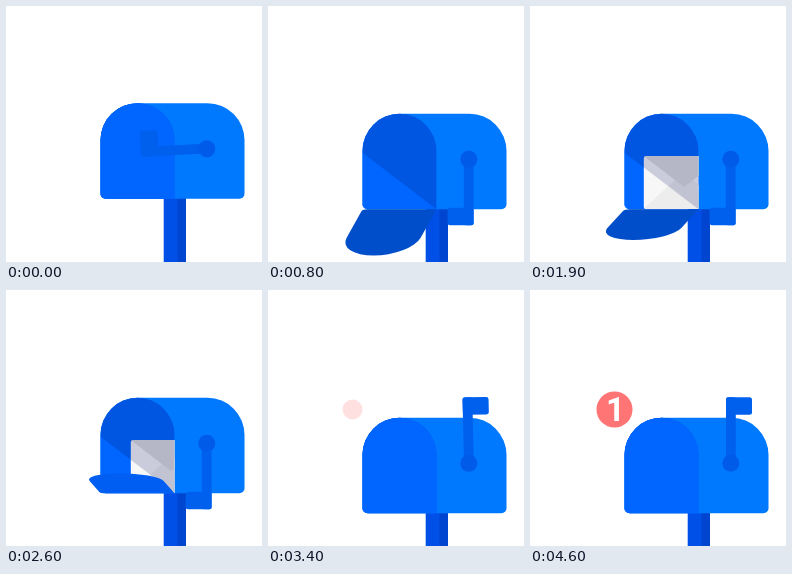
These frames come from a looping animation (256x256 px, 5800 ms). An HTML page with a canvas:

```html
<!DOCTYPE html>
<html lang="en">
<head>
<meta charset="utf-8">
<title>Mailbox</title>
<style>
html, body { margin: 0; width: 100%; height: 100%; overflow: hidden; background: #fff; }
canvas { display: block; width: 256px; height: 256px; }
</style>
</head>
<body>
<canvas id="stage" width="256" height="256"></canvas>
<script>
const ctx = document.getElementById('stage').getContext('2d');
const LOOP = 5800, STEP = 100, LAST = 46;

// Mailbox geometry, measured from the top of the box
const LEFT = 94.5, FRONT = 168.5, RIGHT = 238.5, H = 95.5, R = 37;

// Progress from 0 to 1 between two steps: linear, and eased at both ends
const ramp = (t, from, to) => Math.min(1, Math.max(0, (t - from) / (to - from)));
const smooth = (t, from, to) => {
  const p = ramp(t, from, to);
  return p * p * (3 - 2 * p);
};
const radians = deg => deg * Math.PI / 180;

function shape(color, ...points) {
  ctx.fillStyle = color;
  ctx.beginPath();
  points.forEach(p => ctx.lineTo(...p));
  ctx.fill();
}

function box(color, x, y, w, h, radii = 0) {
  ctx.fillStyle = color;
  ctx.beginPath();
  ctx.roundRect(x, y, w, h, radii);
  ctx.fill();
}

function disc(color, x, y, r) {
  ctx.fillStyle = color;
  ctx.beginPath();
  ctx.arc(x, y, r, 0, Math.PI * 2);
  ctx.fill();
}

function saved(part, ...args) {
  ctx.save();
  part(...args);
  ctx.restore();
}

function arch(color, y) {
  box(color, LEFT, y, FRONT - LEFT, H, [R, R, 1, 5]);
}

// Flies in from the left, falling quickly and then sliding to a stop
function letter(t) {
  const left = 1 - ramp(t, 12, 22);
  ctx.beginPath();
  ctx.rect(0, 0, FRONT, 256);
  ctx.clip();
  ctx.translate(165 - 264 * left ** 2.64, 176.5 - 225 * left ** 7.6);
  ctx.beginPath();
  ctx.roundRect(-40.2, -26.5, 80.4, 53, 2.5);
  ctx.clip();
  box('#f7f7f7', -41, -27, 82, 54);
  shape('#ededed', [-41, 27], [0, -11], [41, 27]);
  shape('#dedede', [-41, -27], [0, 4.5], [41, -27]);
}

function shade(y) {
  ctx.beginPath();
  ctx.roundRect(LEFT, y, FRONT - LEFT, H, [R, R, 1, 5]);
  ctx.clip();
  shape('rgba(0,10,90,.18)', [LEFT, y - 1], [FRONT, y - 1], [FRONT, y + H], [LEFT, y + 39]);
}

// Swings on its bottom edge: flattened by the angle, and leaning left with its depth
function door(y, t) {
  const angle = radians(119 * smooth(t, 2, 8) - 10.3 * smooth(t, 8, 12) - 108.7 * smooth(t, 24, 29.7));
  const up = Math.cos(angle);
  const depth = .31 - .12 * smooth(t, 23, 26);
  ctx.translate(0, y + H);
  ctx.transform(1, 0, depth * Math.sin(angle), up, 0, 0);
  arch(up < 0 ? '#004ec9' : `rgb(0, ${92 + 10 * up}, ${240 + 15 * up})`, -H);
}

function flag(y, t) {
  const turn = -93 - 87 * smooth(t, 0, 5) + 178.7 * smooth(t, 26, 32) + 1.3 * smooth(t, 34, 36);
  ctx.translate(200.8, y + 45.5);
  ctx.rotate(radians(turn));
  box('#0060ee', -4.8, -66, 9.8, 66, 2);
  box('#0060ee', -4.8, -66, 26, 17.5, 2.5);
  disc('#005be8', 0, 0, 8.5);
}

function badge(t) {
  ctx.translate(84.5, 119.5);
  ctx.globalAlpha = .22 + .78 * ramp(t, 34, 38);
  disc('#ff7474', 0, 0, 10 + 8.5 * smooth(t, 34, 37) - .5 * smooth(t, 37, 39));
  ctx.globalAlpha = ramp(t, 39, 43);
  const size = .5 + .57 * smooth(t, 39, 43) - .07 * smooth(t, 43, 45);
  ctx.scale(size, size);
  ctx.fillStyle = '#fff';
  ctx.font = 'bold 33px Roboto, sans-serif';
  ctx.textAlign = 'center';
  ctx.fillText('1', 1, 11.7);
}

function draw(t) {
  // Sinks gently, then drops and bounces back a little
  const y = 97.2 + 10.6 * smooth(t, 0, 6) + 27.5 * smooth(t, 27, 30) - 7.5 * smooth(t, 30, 32);
  box('#fff', 0, 0, 256, 256);
  box('#004fe6', 157.7, y + H - 2, 22.3, 170);
  box('#0045cf', 171.5, y + H - 2, 8.5, 170);
  box('#0079ff', LEFT, y, RIGHT - LEFT, H, [R, R, 5, 5]);
  arch('#0066ff', y);
  if (t > 12 && t < 30) saved(letter, t);
  saved(shade, y);
  saved(door, y, t);
  saved(flag, y, t);
  if (t > 33) saved(badge, t);
}

const start = performance.now();
function tick() {
  const time = (performance.now() - start) % LOOP;
  draw(Math.min(LAST, Math.floor(time / STEP)));
  requestAnimationFrame(tick);
}
tick();
</script>
</body>
</html>
```
